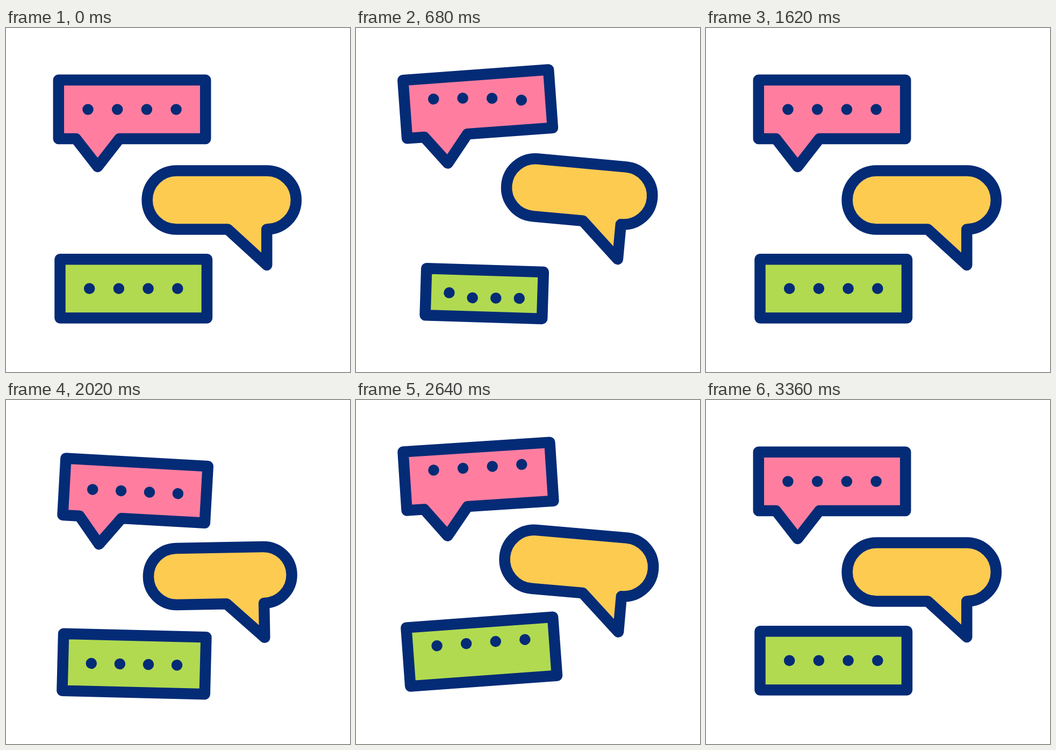
Animation, 640 px wide and 640 px high, one loop 3.6 s. Source, as an HTML page with a canvas:

```html
<!DOCTYPE html>
<html>
<head>
<meta charset="utf-8">
<style>
  html, body { margin: 0; width: 100%; height: 100%; overflow: hidden; background: #fff; }
  canvas { display: block; }
</style>
</head>
<body>
<canvas id="stage" width="640" height="640"></canvas>
<script>
const ctx = document.getElementById('stage').getContext('2d');
const LOOP = 3600, REPEAT = 1748, DOT_LAG = 28;

const easeIn = x => x ** 2.1;
const easeOut = x => 1 - (1 - x) ** 5;
const easeBoth = n => x => x ** n / (x ** n + (1 - x) ** n);

// Eased change by a given amount between two times
const move = (t, start, end, amount, ease) =>
  amount * ease(Math.min(1, Math.max(0, (t - start) / (end - start))));

// Each motion winds up, swings past and settles
const tilt = t => move(t, 0, 400, 3.7, easeBoth(2.5))
  + move(t, 500, 718, -7.9, easeBoth(3.2))
  + move(t, 718, 1270, 4.2, easeBoth(2.6));

const squeeze = t => move(t, 0, 532, 1, easeIn) + move(t, 532, 702, -1, easeBoth(1.5));

const bounce = t => move(t, 0, 567, 11, easeIn)
  + move(t, 567, 829, -28, easeOut)
  + move(t, 945, 1446, 17, easeOut);

const HALF_W = 136.7, HALF_H = 54.6, BEND = 84;

function box(tail = []) {
  const corners = [[-HALF_W, -HALF_H], [HALF_W, -HALF_H], [HALF_W, HALF_H], ...tail, [-HALF_W, HALF_H]];
  for (const [x, y] of corners) ctx.lineTo(x, y);
}

function pill() {
  ctx.arc(BEND, 0, HALF_H, -Math.PI / 2, Math.PI / 2);
  ctx.lineTo(BEND, 121);
  ctx.lineTo(11.5, HALF_H);
  ctx.arc(-BEND, 0, HALF_H, Math.PI / 2, Math.PI * 1.5);
}

// turn and lift hold factors for wind-up and swing; side is the x shift per degree
const bubbles = [
  { x: 234.5, y: 151.4, color: '#ff7ea0', delay: 0, dots: 4,
    turn: [1, 1], side: 1.9, lift: [4.8, 2.5], shrink: .13, sink: 57,
    shape: () => box([[-23.5, HALF_H], [-64, 106.6], [-104.5, HALF_H]]) },
  { x: 401.2, y: 320, color: '#fecb51', delay: 12, dots: 0,
    turn: [-.35, -1.3], side: 2.75, lift: [-3.3, -3.3], shrink: .17, sink: 90,
    shape: pill },
  { x: 237.2, y: 484.8, color: '#b1da51', delay: 90, dots: 4,
    turn: [1, 1], side: .85, lift: [4.1, 4], shrink: .28, sink: 10,
    shape: () => box() }
];

function drawBubble(b, time) {
  const t = time - b.delay, swing = tilt(t), phase = swing > 0 ? 0 : 1;
  const angle = swing * b.turn[phase], small = b.shrink * squeeze(t);

  ctx.save();
  ctx.translate(b.x + angle * b.side, b.y + angle * b.lift[phase] + small * b.sink);
  ctx.rotate(angle * Math.PI / 180);
  ctx.scale(1 - small, 1 - small);
  const inner = ctx.getTransform();

  ctx.beginPath();
  b.shape();
  ctx.closePath();
  ctx.resetTransform(); // line width stays constant
  ctx.fillStyle = b.color;
  ctx.fill();
  ctx.stroke();

  ctx.setTransform(inner);
  ctx.beginPath();
  for (let i = 0; i < b.dots; i++) {
    const x = (i - 1.5) * 54.7, y = bounce(t - i * DOT_LAG);
    ctx.moveTo(x, y);
    ctx.lineTo(x + .01, y);
  }
  ctx.resetTransform();
  ctx.stroke();
  ctx.restore();
}

function frame(now) {
  const t = now % LOOP;
  ctx.fillStyle = '#fff';
  ctx.fillRect(0, 0, 640, 640);
  ctx.strokeStyle = '#042b76';
  ctx.lineWidth = 20.5;
  ctx.lineJoin = ctx.lineCap = 'round';
  for (const b of bubbles) drawBubble(b, t < REPEAT ? t : t - REPEAT);
}

let start;
function tick(now) {
  start ??= now;
  frame(now - start);
  requestAnimationFrame(tick);
}
frame(0);
requestAnimationFrame(tick);
</script>
</body>
</html>
```
